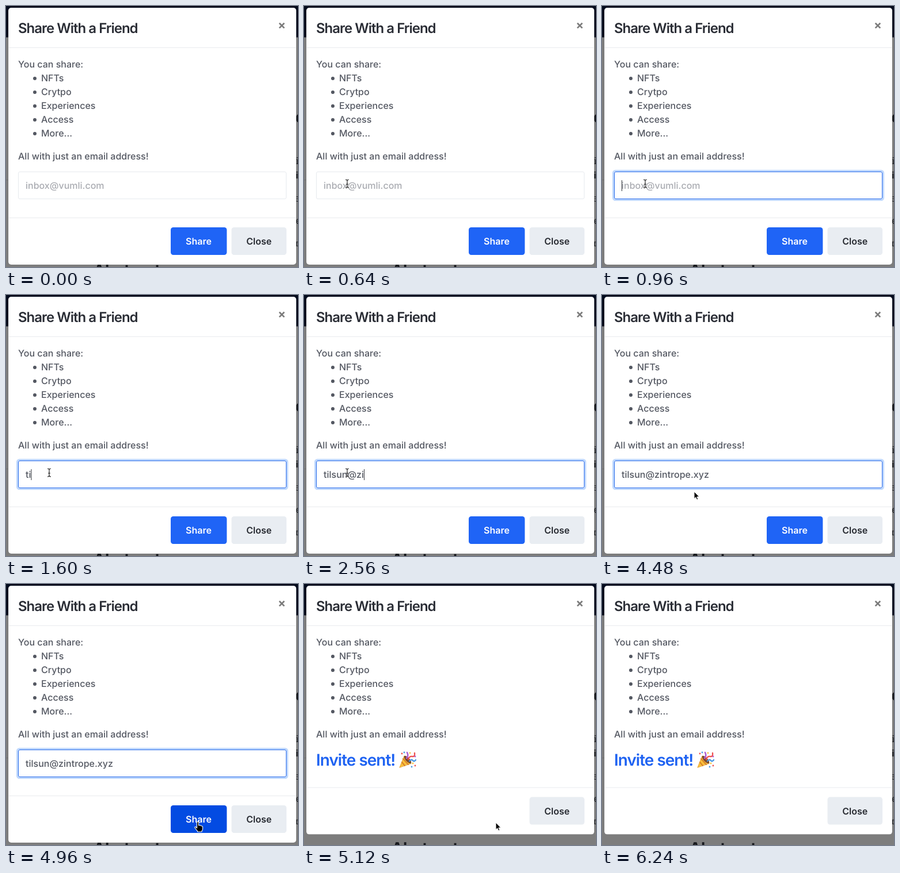
Write an HTML page that moves like this. It is 507x454 px and loops after 6.56 s.

```html
<!DOCTYPE html>
<html lang="en">
<head>
<meta charset="utf-8">
<title>Share dialog</title>
<style>
  html, body { margin: 0; width: 100%; height: 100%; overflow: hidden; background: #7d7d7d; }
  svg { display: block; width: 507px; height: 454px; font: 500 16px Inter, sans-serif; text-rendering: geometricPrecision; }
  .head { font-weight: 600; letter-spacing: -1px; }
  .btn { font-weight: 600; text-anchor: middle; }
  .body { fill: #545862; }
  .serif { font-family: "Noto Serif", serif; font-weight: 400; }
</style>
</head>
<body>
<svg viewBox="0 0 507 454">
  <!-- dimmed page -->
  <rect width="507" height="454" fill="#7d7d7d"/>
  <rect width="507" height="54.5" fill="#030b1d"/>
  <rect y="302" width="5" height="1" fill="#707070"/>
  <g fill="#16181c">
    <text class="head" x="151" y="471" font-size="30">Abstract</text>
    <text class="head" x="502" y="203" font-size="28">o</text>
    <text class="serif" x="503" y="275">i</text>
    <text x="503" y="300" font-weight="700">i</text>
    <g class="serif">
      <text x="501" y="340">e</text>
      <text x="503" y="379">e</text>
      <text x="502" y="418">r</text>
    </g>
  </g>

  <!-- dialog -->
  <rect id="panel" x="4" y="3" width="500" height="447" rx="5" fill="#fff" stroke="#000" stroke-opacity=".12"/>
  <text class="head" x="21" y="47" font-size="24" fill="#2a2d35">Share With a Friend</text>
  <path d="M474.6 29.8l8.6 8.6m0-8.6l-8.6 8.6" stroke="#7c7c7c" stroke-width="2.7"/>
  <rect x="4.5" y="72" width="499" height="1" fill="#e9ebee"/>
  <g class="body">
    <text x="21" y="107">You can share:</text>
    <g id="list"></g>
    <text x="21" y="267">All with just an email address!</text>
  </g>

  <g id="form">
    <rect id="ring" x="19.5" y="286.5" width="469" height="51" rx="4" fill="none" stroke="#bfd8fd" stroke-width="3"/>
    <rect id="box" x="21.5" y="288.5" width="465" height="47" rx="2.5" fill="#fff"/>
    <text id="field" x="34" y="318"></text>
    <rect id="caret" y="303" width="1" height="19" fill="#33363c"/>
    <rect id="share" x="286" y="385" width="97.4" height="48" rx="4.5"/>
    <text class="btn" x="334.5" y="415" fill="#fff">Share</text>
  </g>

  <g id="sent">
    <text class="head" x="21" y="315.5" font-size="28" fill="#1f63f2">Invite sent!</text>
    <g transform="translate(165 291)" fill="none" stroke-linecap="round">
      <path d="M1 28L9 8Q17 12 21 21Z" fill="#f9c23c" stroke="#e0982a" stroke-width=".8"/>
      <path d="M5 19l5 6M7 13l9 10" stroke="#d9822b" stroke-width="2"/>
      <ellipse cx="15" cy="14.5" rx="3.3" ry="8.6" transform="rotate(-43 15 14.5)" fill="#7a4a2c"/>
      <path d="M13 12Q17 8 14 2" stroke="#b05fd0" stroke-width="2.6"/>
      <path d="M16 14Q18 8 23 9T27 3" stroke="#ef5350" stroke-width="2.4"/>
      <path d="M18 17Q22 13 24 16T29 15" stroke="#4a9be8" stroke-width="2.4"/>
      <g id="confetti"></g>
    </g>
  </g>

  <g id="foot">
    <rect x="4.5" y="368" width="499" height="1" fill="#e9ebee"/>
    <rect x="391.5" y="385" width="95.5" height="48" rx="4.5" fill="#e9edf2"/>
    <text class="btn" x="439.3" y="415" fill="#272a31">Close</text>
  </g>

  <!-- pointers, hot spot at 0,0 -->
  <g id="pointers" stroke-linejoin="round">
    <g id="beam" fill="none">
      <path d="M-3-7Q0-7 0-5Q0-7 3-7M0-5V5M-3 7Q0 7 0 5Q0 7 3 7M-2 1H2" stroke="#fff" stroke-width="2.6" stroke-opacity=".7"/>
      <path d="M-3-7Q0-7 0-5Q0-7 3-7M0-5V5M-3 7Q0 7 0 5Q0 7 3 7M-2 1H2" stroke="#222" stroke-width="1.2"/>
    </g>
    <path id="arrow" d="M0 0V12.4L2.8 9.8L4.7 14.2L6.8 13.3L4.9 9H8.8Z" fill="#000" stroke="#fff"/>
    <path id="hand" d="M-1.5 0Q-1.5-1.5 0-1.5T1.5 0V5Q2.8 4 4 5.2Q5.4 4.5 6.5 6Q8.5 5.6 8.5 8V11Q8.5 13 7 14.5V16H-.5V14.8Q-3 12-5 9Q-5.5 7.2-3.7 7.3L-1.5 9.5Z" fill="#000" stroke="#fff" stroke-width="1.1"/>
  </g>
</svg>
<script>
const LOOP = 6560, TICK = 160;
const $ = id => document.getElementById(id);
const hint = "inbox@vumli.com", address = "tilsun@zintrope.xyz";

$("list").innerHTML = ["NFTs", "Crytpo", "Experiences", "Access", "More..."].map((s, i) =>
  `<circle cx="50" cy="${126 + 24 * i}" r="3"/><text x="61" y="${131 + 24 * i}">${s}</text>`).join("");

$("confetti").innerHTML = [
  [5, 4, "#ef5350"], [9, 2, "#4a9be8"], [19, 3, "#f9c23c"], [28, 9, "#b05fd0"],
  [24, 21, "#f9c23c"], [28, 25, "#ef5350"], [22, 27, "#4a9be8"]
].map(([x, y, c]) => `<circle cx="${x}" cy="${y}" r="1.4" fill="${c}"/>`).join("");

// [time, letters typed]
const typing = [[0, 0], [1440, 1], [1600, 2], [1760, 3], [1920, 4], [2080, 6], [2240, 7],
  [2560, 9], [2720, 10], [2880, 11], [3040, 13], [3200, 14], [3360, 16], [3680, 17], [3840, 19]];

// [time, pointer, x, y]
const moves = [[0, ""],
  [160, "hand", 322, 410], [320, "arrow", 212, 358], [480, "beam", 104, 319], [640, "beam", 75, 309],
  [4160, "beam", 79, 311], [4320, "beam", 98, 318], [4480, "arrow", 160, 342],
  [4640, "arrow", 258, 380], [4800, "hand", 325, 409], [4960, "hand", 333, 415],
  [5120, "arrow", 333, 415], [5760, "arrow", 365, 408], [5920, "arrow", 190, 345],
  [6080, "beam", 37, 305], [6240, ""]];

const focus = [[0, 0], [800, 0.5], [960, 1]];
const caret = [[0, 0], [960, 1], [1120, 0], [1440, 1], [4160, 0]];

const at = (table, t) => table.findLast(row => row[0] <= t);
const show = (id, on) => $(id).setAttribute("visibility", on ? "visible" : "hidden");

function draw(time) {
  const t = Math.floor(time % LOOP / TICK) * TICK;
  const sent = t >= 5120;
  const count = at(typing, t)[1];
  const glow = at(focus, t)[1];
  const [, pointer, x, y] = at(moves, t);

  $("form").style.display = sent ? "none" : "";
  $("sent").style.display = sent ? "" : "none";
  $("panel").setAttribute("height", sent ? 432.6 : 447);
  $("foot").setAttribute("transform", `translate(0 ${sent ? -14.4 : 0})`);

  if (!sent) {
    const field = $("field");
    field.textContent = count ? address.slice(0, count) : hint;
    field.setAttribute("fill", count ? "#545862" : "#a9abb1");
    $("ring").setAttribute("opacity", glow);
    $("box").setAttribute("stroke", ["#e7eaee", "#86a9f2", "#2468ea"][glow * 2]);
    $("caret").setAttribute("x", 34 + (count ? field.getComputedTextLength() : 0));
    $("caret").setAttribute("opacity", at(caret, t)[1]);
    $("share").setAttribute("fill", pointer === "hand" ? "#034be2" : "#1f64f6");
  }

  for (const id of ["beam", "arrow", "hand"]) show(id, id === pointer);
  if (pointer) $("pointers").setAttribute("transform", `translate(${x} ${y})`);
}

const start = performance.now();
function loop() {
  draw(performance.now() - start);
  requestAnimationFrame(loop);
}
loop();
</script>
</body>
</html>
```
